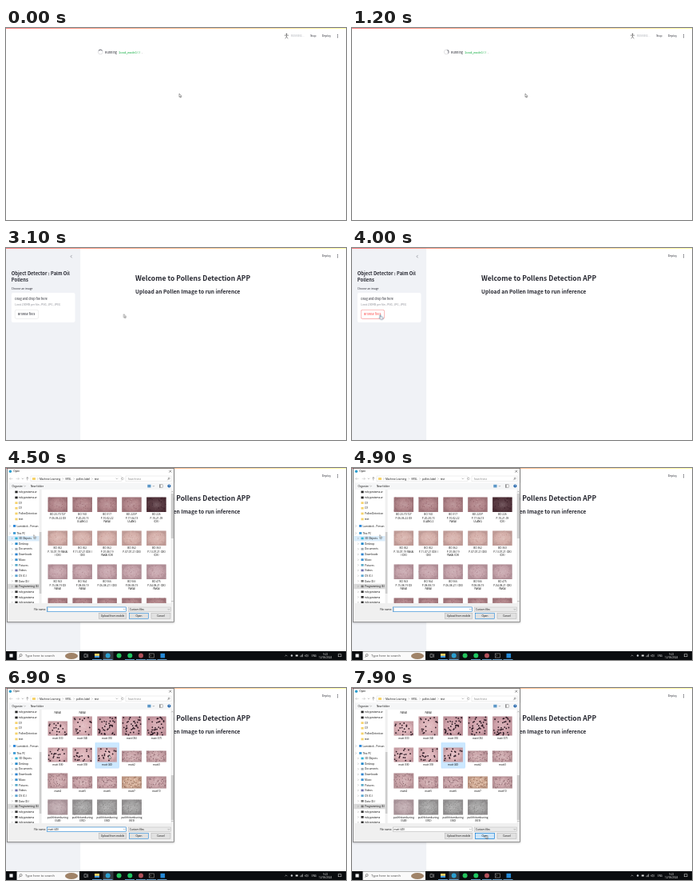
These frames come from a looping animation (426x240 px, 8000 ms). An HTML page:

```html
<!DOCTYPE html>
<html lang="en">
<head>
<meta charset="utf-8">
<title>Pollen detection app</title>
<style>
html, body { margin: 0; width: 100%; height: 100%; overflow: hidden; background: #fff; }
svg { display: block; width: 100vw; height: 100vh; }
text { white-space: pre; }
.app { font-family: "Noto Sans CJK JP", "Noto Sans CJK SC", "Noto Sans", sans-serif; fill: #262730; }
.win { font-family: "Open Sans", "Noto Sans", sans-serif; font-size: 3.15px; fill: #0c0c0c; }
.mono { font-family: "Noto Sans Mono", monospace; }
.b { font-weight: 700; }
.mid { text-anchor: middle; }
.end { text-anchor: end; }

/* Hard cuts and the list scroll share one 8 s step timeline */
.loading, .status, .page, .press, .dialog, .hoverTree, .hoverItem, .picked, .empty, .focus, .overOpen, .hand, .arrow, .scroll {
  animation: 8s step-end infinite;
}
.loading { animation-name: loading; }
.status { animation-name: status; }
.page { animation-name: page; }
.press { animation-name: press; }
.dialog { animation-name: dialog; }
.hoverTree { animation-name: hoverTree; }
.hoverItem { animation-name: hoverItem; }
.picked { animation-name: picked; }
.empty { animation-name: empty; }
.focus { animation-name: focus; }
.overOpen { animation-name: overOpen; }
.hand { animation-name: hand; }
.arrow { animation-name: arrow; }
.scroll { animation-name: scroll; --s: 0; }
.list { transform: translateY(calc(var(--s) * -204.5px)); }
.knob { transform: translateY(calc(var(--s) * 77px)); }
.spin { animation: spin 1s linear infinite; transform-origin: 118.3px 30px; }
.cursor { animation: move 8s ease-in-out infinite; }

@keyframes loading { 0% { opacity: 1 } 32.5%, 100% { opacity: 0 } }
@keyframes status { 0% { opacity: 1 } 36.25%, 100% { opacity: 0 } }
@keyframes page { 0% { opacity: 0 } 32.5%, 100% { opacity: 1 } }
@keyframes press { 0% { opacity: 0 } 43.75%, 100% { opacity: 1 } }
@keyframes dialog { 0% { opacity: 0 } 53.75%, 100% { opacity: 1 } }
@keyframes hoverTree { 0% { opacity: 0 } 53.75% { opacity: 1 } 63.75%, 100% { opacity: 0 } }
@keyframes hoverItem { 0% { opacity: 0 } 71.25% { opacity: 1 } 76.25%, 100% { opacity: 0 } }
@keyframes picked { 0% { opacity: 0 } 80%, 100% { opacity: 1 } }
@keyframes empty { 0% { opacity: 1 } 80%, 100% { opacity: 0 } }
@keyframes focus { 0% { opacity: 1 } 95%, 100% { opacity: 0 } }
@keyframes overOpen { 0% { opacity: 0 } 95%, 100% { opacity: 1 } }
@keyframes hand { 0% { opacity: 0 } 43.75% { opacity: 1 } 53.75%, 100% { opacity: 0 } }
@keyframes arrow { 0% { opacity: 1 } 43.75% { opacity: 0 } 53.75%, 100% { opacity: 1 } }
@keyframes scroll {
  0% { --s: 0 } 66.25% { --s: .17 } 67.5% { --s: .42 } 68.75% { --s: .69 } 70% { --s: .91 } 71.25%, 100% { --s: 1 }
}
@keyframes spin { to { transform: rotate(360deg) } }
@keyframes move {
  0%, 35% { transform: translate(217px, 82px) }
  43.75%, 62.5% { transform: translate(34.5px, 83.5px) }
  67.5%, 68.75% { transform: translate(118px, 110px) }
  71.25%, 75% { transform: translate(101.5px, 96px) }
  78.75%, 90% { transform: translate(129px, 84px) }
  96.25%, 100% { transform: translate(167.5px, 184px) }
}
</style>
</head>
<body>
<svg id="stage" viewBox="0 0 426 240" preserveAspectRatio="none"></svg>
<script>
let seed = 7;
const rand = () => (seed = (seed * 16807) % 2147483647) / 2147483647;

const g = (cls, ...kids) => `<g class="${cls}">${kids.flat().join('')}</g>`;
const rect = (x, y, w, h, fill, more = '') => `<rect x="${x}" y="${y}" width="${w}" height="${h}" fill="${fill}" ${more}/>`;
const dot = (x, y, r, fill) => `<circle cx="${x}" cy="${y}" r="${r}" fill="${fill}"/>`;
const line = (d, color, w = .5) => `<path d="${d}" fill="none" stroke="${color}" stroke-width="${w}" stroke-linecap="round"/>`;
const text = (x, y, s, { size, fill, cls = '' } = {}) =>
  `<text x="${x}" y="${y}" class="${cls}" style="${size ? `font-size:${size}px;` : ''}${fill ? `fill:${fill}` : ''}">${s}</text>`;
const border = (color, w = .4) => `stroke="${color}" stroke-width="${w}"`;

// Thumbnail: softly lit tone scattered with round specks
function specks(x, y, w, h, n, size, color) {
  let d = '';
  for (let i = 0; i < n; i++) {
    const px = x + size / 2 + rand() * (w - size), py = y + size / 2 + rand() * (h - size);
    d += `M${px.toFixed(1)} ${py.toFixed(1)}h0`;
  }
  return line(d, color, size);
}
function thumb(cx, bottom, w, h, [tone, light, dark, count, size]) {
  const x = cx - w / 2, y = bottom - h;
  return rect(x, y, w, h, tone) + specks(x, y, w, h, 40, 1.3, light) +
    rect(x, y, w, h, 'url(#lit)') + specks(x, y, w, h, count, size, dark);
}

const tones = {
  rose: ['#ad7f84', '#b88c8f', '#96666d', 28, 1],
  night: ['#4f2f37', '#5a3a42', '#3a2029', 20, 1.2],
  sand: ['#d3aca6', '#dbb8b1', '#c2968f', 24, .9],
  lilac: ['#c29ea6', '#ccabb2', '#ab838d', 28, .9],
  pink: ['#dbaeb4', '#e3bec1', '#2f1c26', 20, 1.8],
  dense: ['#cf9ea7', '#d9b0b5', '#2a1822', 38, 1.8],
  mixed: ['#c79fa4', '#d6b8b8', '#7c5960', 36, 1],
  earth: ['#cfa68f', '#ecd2bc', '#8a6450', 28, 1.2],
  grey: ['#9f9e9e', '#b4b3b3', '#7d7c7c', 60, .7],
  mauve: ['#b9a3a8', '#c4b0b5', '#a08b92', 40, .8]
};

const colX = i => 64.8 + i * 30.9;
const label = (cx, y, lines) => lines.map((s, i) => text(cx, y + i * 4.5, s, { cls: 'mid' })).join('');

const dated = [
  'BO 23-70 727/P-06-06-22 DX|BO 160/P-20-20-15/ULANG 2|BO 317/P-10-02-22/PAKAI|BO 220 P/P-17-04-13/ULANG|BO 226/P-10-21-09/(DX)',
  'BO 362/P-10-07-19 PAKAI/I (DX)|BO 362/P-11-07-21 (DX) I/(DX)|BO 362/P-01-08-19/PAKAI (DX)|BO 362/P-07-07-21 (DX)|BO 363/P-13-07-21 (DX)/(DX)',
  'BO 563/P-15-08-19 DX/PAKAI|BO 564/P-08-08-19/PAKAI|BO 566/P-06-08-21 I (DX)|BO 566/P-08-08-19/PAKAI|BO 475/P-04-08-21 (DX)/PAKAI',
  'BO 580/P-02-07-21/(DX)|BO 581/P-12-08-19/PAKAI|BO 583/P-05-07-21/(DX)|BO 590/P-16-08-19/PAKAI|BO 591/P-03-07-21/(DX)',
  'BO 602/P-09-08-19/PAKAI|BO 604/P-14-07-21/PAKAI|BO 605/P-07-08-19|BO 611/P-01-07-21|BO 614/P-18-08-19'
];
const named = [
  'matt (33)|matt (34)|matt (35)|matt (36)|matt (37)',
  'matt (38)|matt (39)|matt (40)|matt2|matt3',
  'matt4|matt5|matt6|matt7|matt10',
  'putihhitamkuning/(348)|putihhitamkuning/(350)|putihhitamkuning/(360)|putihhitamkuning/(369)'
];
const namedSize = (r, c) =>
  r === 0 ? [24.5, c ? 24 : 18] : r === 1 ? (c < 3 ? [24.5, 18] : [25, 14]) : r === 2 ? [25, c ? 15 : 19] : [25, 19];
const namedTone = (r, c) =>
  r === 0 ? (c < 2 ? 'pink' : 'dense') : r === 1 ? (c < 3 ? 'pink' : 'mixed') : r === 2 ? (c === 3 ? 'earth' : 'mixed') : (c ? 'grey' : 'mauve');

const files = [
  ...dated.flatMap((row, r) => row.split('|').map((name, c) => {
    const tone = r === 0 && c === 4 ? 'night' : ['rose', 'sand', 'lilac'][r % 3];
    const bottom = 55 + r * 42;
    return thumb(colX(c), bottom, 24.5, 18.5, tones[tone]) + label(colX(c), bottom + 4.2, name.split('/'));
  })),
  rect(81, 273, 29.5, 31.5, '#e5f3ff', 'class="hoverItem"'),
  rect(112, 273, 29.5, 31.5, '#cce8ff', `class="picked" ${border('#99d1ff')}`),
  ...named.flatMap((row, r) => row.split('|').map((name, c) => {
    const bottom = 264 + r * 33;
    return thumb(colX(c), bottom, ...namedSize(r, c), tones[namedTone(r, c)]) + label(colX(c), bottom + 4.4, name.split('/'));
  }))
];

const tree = [
  [30, 'rizkypratama.w', '#222'], [37, 'rizkypratama.w', '#222'], [43.7, 'CV', '#f5d26b'], [50.3, 'CV', '#f5d26b'],
  [57, 'PollenDetection', '#f5d26b'], [64, 'test', '#f5d26b'], [72.5, 'Lumidock - Person', '#2a86d8', 1], [81.5, 'This PC', '#3a9bd6', 1],
  [88, '3D Objects', '#35b2d5'], [94.7, 'Desktop', '#2387c8'], [101.3, 'Documents', '#9aa4ad'], [108, 'Downloads', '#2d83d0'],
  [114.7, 'Music', '#3b8fd0'], [121.4, 'Pictures', '#58a9c8'], [128, 'Videos', '#6b6fb0'], [134.7, 'OS (C:)', '#5aa3d0'],
  [141.4, 'Data (D:)', '#777'], [148, 'Programming (E:)', '#777'], [154.8, 'rizkypratama', '#333'], [161.4, 'rizkypratama', '#333'], [168, 'rizkypratama', '#333']
].map(([y, s, color, top]) => rect(top ? 9 : 11.4, y - 1.4, 3.2, 2.7, color) + text(top ? 13.4 : 16, y + 1.1, s) +
  (y > 72 ? chevron(top ? 4.6 : 7.4, y) : ''));

function chevron(x, y) { return line(`M${x} ${y - .8}l.8 .8l-.8 .8`, '#666', .35); }
function caret(x, y) { return line(`M${x} ${y}l.9 .9l.9 -.9`, '#444', .35); }

const button = (x, w, s, color, extra = '') =>
  rect(x, 181.4, w, 7, '#e1e1e1', border(color, .5)) + extra + text(x + w / 2, 186.1, s, { cls: 'mid' });

const header = g('app',
  g('status',
    dot(351.5, 7.6, .8, '#555'),
    line('M349.2 9.2h4.6M351.5 9v2l-1.5 2M351.5 11l1.5 2', '#555', .6),
    text(357, 11.2, 'RUNNING...', { size: 3.1, fill: '#a9abb2' }),
    text(381.3, 11.3, 'Stop', { size: 3.4 })),
  text(396, 11.3, 'Deploy', { size: 3.4 }),
  [8.3, 10, 11.7].map(y => dot(415.6, y, .55, '#262730')));

const loading = g('app loading',
  `<circle cx="118.3" cy="30" r="2.9" fill="none" stroke="#d6d6d9" stroke-width=".7"/>`,
  g('spin', line('M116.25 27.95a2.9 2.9 0 0 1 4.1 0', '#31333f', .7)),
  text(124, 31.6, 'Running', { size: 3.85 }),
  text(141, 31.6, 'load_model()', { size: 3.85, fill: '#09ab3b', cls: 'mono' }),
  text(169.8, 31.6, '.', { size: 3.85 }));

const page = g('app page',
  rect(0, 0, 93.2, 240, '#f0f2f6'),
  line('M82.3 9.2l-1.2 1.4l1.2 1.4', '#555761', .5),
  text(6.8, 33.6, 'Object Detector : Palm Oil', { size: 5.8, cls: 'b' }),
  text(6.8, 41.8, 'Pollens', { size: 5.8, cls: 'b' }),
  text(6.8, 52, 'Choose an image', { size: 3.35 }),
  rect(6.8, 56, 79.7, 37, '#fff', 'rx="2"'),
  text(11.2, 65, 'Drag and drop file here', { size: 3.85 }),
  text(11.2, 71.6, 'Limit 200MB per file • PNG, JPG, JPEG', { size: 3.3, fill: '#8b8d95' }),
  rect(11.3, 77.3, 29.3, 11.2, '#fff', `rx="2" ${border('#d6d7da')}`),
  text(14.7, 84.4, 'Browse files', { size: 3.85 }),
  g('press',
    rect(11.3, 77.3, 29.3, 11.2, '#fff', `rx="2" ${border('#ff4b4b')}`),
    text(14.7, 84.4, 'Browse files', { size: 3.85, fill: '#ff4b4b' })),
  text(162, 40.5, 'Welcome to Pollens Detection APP', { size: 8.61, cls: 'b' }),
  text(162, 57, 'Upload an Pollen Image to run inference', { size: 6.7, cls: 'b' }));

const topBar = rect(0, 0, 426, .7, 'url(#warm)');

const icons = [
  [127.7, '#2b9fd0'], [141.6, '#25c35c'], [155.3, '#1ec760'], [169, '#b0505a']
].map(([x, c]) => dot(x, 234.5, 3, c));

const taskbar = [
  rect(0, 229, 426, 11, '#0a0c0f'),
  rect(4.4, 232.4, 4.2, 4.2, '#f2f2f2'),
  rect(13.5, 229.3, 78.5, 10.7, '#fafafa'),
  `<circle cx="18.6" cy="234" r="1.5" fill="none" stroke="#333" stroke-width=".5"/>`, line('M17.6 235.2l-1.2 1.3', '#333'),
  text(24, 236, 'Type here to search', { size: 4.05, fill: '#444' }),
  `<ellipse cx="82" cy="235" rx="8" ry="4" fill="#a08368"/>`,
  rect(98, 232.8, 3, 3.6, 'none', border('#ddd', .5)), line('M102.5 232.8v3.6', '#ddd'),
  rect(121.5, 229, 13, 11, '#343a40'),
  rect(111, 232, 6, 5, '#f6cf60'), rect(111, 234.8, 6, 2.2, '#3f9be0'),
  icons,
  rect(179.5, 232, 6, 5, '#050505', border('#bbb', .5)), line('M180.8 233.5l1 .9l-1 .9', '#eee', .4),
  rect(193.5, 231.8, 5.6, 5.6, '#2489d8'),
  [108, 121.5, 149, 163, 176, 189.5].map(x => rect(x, 239.2, 12, .8, '#76b9ed')),
  line('M349.8 235l1.2 -1.2l1.2 1.2', '#ddd'),
  dot(358, 234.5, 1.2, '#c8cbd0'), rect(362.8, 233.5, 3, 2, '#ddd'),
  line('M369 235.8v-.8M370.3 235.8v-1.8M371.6 235.8v-2.8', '#ddd', .6),
  line('M375 234h1l1 -1v3.2l-1 -1h-1zM378.4 233.6v2', '#ddd', .4),
  text(386, 235.8, 'ENG', { size: 2.9, fill: '#eee', cls: 'mid' }),
  text(400.2, 233.8, '9:22', { size: 3.1, fill: '#eee', cls: 'mid' }),
  text(400.2, 238.3, '12/06/2024', { size: 3.1, fill: '#eee', cls: 'mid' }),
  rect(416.2, 232.8, 3.8, 3, 'none', border('#eee', .5))
];

const frame = [
  rect(1.5, .5, 209, 192, '#fff', `${border('#555', .7)} filter="url(#soft)"`),
  dot(5.4, 4.2, 1.7, '#2b9fd0'), text(9.2, 5.3, 'Open'),
  line('M204.6 3l2.4 2.4M207 3l-2.4 2.4', '#222', .45),
  line('M8 13.4h-3.4l1.3 -1.3M4.6 13.4l1.3 1.3M13 13.4h3.4l-1.3 -1.3M16.4 13.4l-1.3 1.3', '#aaa', .4),
  caret(20, 13), line('M26.8 15v-3.4l-1.2 1.2M26.8 11.6l1.2 1.2', '#444', .4),
  rect(31, 10, 113.5, 6.8, '#fff', border('#d5d5d5')),
  rect(33, 12, 4, 3, '#f5d26b'), chevron(39.5, 13.5), text(42, 14.6, 'Machine Learning'),
  chevron(71, 13.5), text(74.6, 14.6, 'KRSL'), chevron(84.8, 13.5), text(88, 14.6, 'pollen-label'),
  chevron(107.6, 13.5), text(110.7, 14.6, 'test'), caret(138, 13), line('M147 12.4a1.3 1.3 0 1 0 .2 1.4', '#555', .4),
  rect(150, 10, 57, 6.8, '#fff', border('#d5d5d5')),
  text(152.8, 14.6, 'Search test', { fill: '#777' }),
  `<circle cx="204.2" cy="13" r="1" fill="none" stroke="#333" stroke-width=".4"/>`, line('M203.4 14l-.8 .9', '#333', .4),
  rect(1.9, 18.4, 208.2, 8.6, '#f5f6f7'),
  text(7.6, 23.8, 'Organize'), caret(22.6, 22.3), text(31, 23.8, 'New folder'),
  rect(177.3, 20.8, 4.2, 3.6, '#5b97c7'), caret(184, 22.3), rect(192.2, 20.8, 4, 3.6, '#fff', border('#666')),
  rect(192.2, 20.8, 1.4, 3.6, '#888'), dot(204.4, 22.6, 2, '#1a5fa8'), text(204.4, 23.7, '?', { fill: '#fff', cls: 'mid b' })
];

const panes = [
  rect(1.9, 85, 40, 6.4, '#d9ecfb', 'class="hoverTree"'),
  rect(1.9, 144.8, 40, 6.5, '#d9d9d9'),
  `<g clip-path="url(#side)">${tree.join('')}</g>`,
  rect(41.6, 27, 3, 142, '#f0f0f0'), rect(41.8, 80, 2.6, 77, '#cdcdcd'),
  g('scroll',
    `<g clip-path="url(#view)">${g('list', files)}</g>`,
    rect(206.6, 27, 3.5, 142, '#f0f0f0'),
    rect(206.8, 32, 3.2, 56, '#cdcdcd', 'class="knob"'),
    line('M207.6 30l.8 -.8l.8 .8M207.6 166.3l.8 .8l.8 -.8', '#555', .4))
];

const footer = [
  rect(1.9, 169, 208.2, 23.2, '#f0f0f0'),
  text(50, 178, 'File name:', { cls: 'end' }),
  rect(51.5, 174, 99, 5.6, '#fff', border('#9a9a9a')),
  rect(51.5, 174, 99, 5.6, '#fff', `class="focus" ${border('#0078d7', .5)}`),
  g('empty', line('M52.8 175.2v3.4', '#222', .3)),
  g('picked', text(52.5, 178, 'matt (40)')),
  caret(147.4, 176.4),
  rect(153.5, 174, 52.8, 5.6, '#e9e9e9', border('#aaa')), text(155, 178, 'Custom files'), caret(203, 176.4),
  button(116.3, 34.5, 'Upload from mobile', '#adadad'),
  button(154.5, 24, 'Open', '#0078d7', rect(154.5, 181.4, 24, 7, '#cfe6f8', `class="overOpen" ${border('#0078d7', .5)}`)),
  button(182, 24, 'Cancel', '#adadad')
];

const cursor = g('cursor',
  g('arrow', `<path d="M0 0v4.4l1 -.9l.7 1.6l.7 -.3l-.7 -1.5h1.4z" fill="#fff" stroke="#222" stroke-width=".4"/>`),
  g('hand', `<path d="M.5 .4q.5 -.5 1 0v2l2.4 .5q.6 .2 .5 .9l-.4 2h-2.8l-1.7 -2.2q.2 -.7 1 0z" fill="#fff" stroke="#234a70" stroke-width=".5"/>`));

document.getElementById('stage').innerHTML = `
  <defs>
    <linearGradient id="warm"><stop stop-color="#ff4b4b"/><stop offset="1" stop-color="#fffd80"/></linearGradient>
    <radialGradient id="lit">
      <stop stop-color="#fff" stop-opacity=".2"/><stop offset=".6" stop-color="#fff" stop-opacity=".05"/>
      <stop offset="1" stop-color="#201018" stop-opacity=".12"/>
    </radialGradient>
    <clipPath id="side"><rect x="1.9" y="27" width="39.7" height="142"/></clipPath>
    <clipPath id="view"><rect x="46" y="27" width="160.6" height="142"/></clipPath>
    <filter id="soft" x="-5%" y="-5%" width="110%" height="110%"><feDropShadow dx="0" dy=".8" stdDeviation="1" flood-opacity=".25"/></filter>
  </defs>
  ${rect(0, 0, 426, 240, '#fff')}
  ${page}${loading}${header}${topBar}
  ${g('win dialog', taskbar, frame, panes, footer)}
  ${cursor}`;
</script>
</body>
</html>
```
